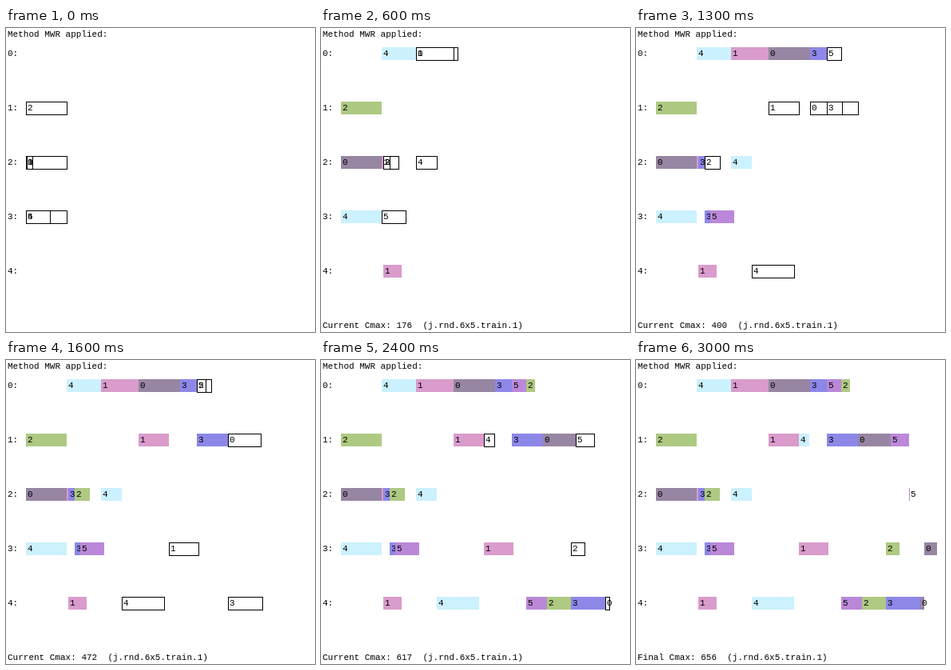
Write an HTML page with a canvas that moves like this. It is 387 px wide and 380 px high and loops after 3.1 s.

```html
<!DOCTYPE html>
<html lang="en">
<head>
<meta charset="utf-8">
<title>Job shop schedule</title>
<style>
  html, body { margin: 0; width: 100%; height: 100%; overflow: hidden; background: #fff; }
  canvas { display: block; }
</style>
</head>
<body>
<canvas id="stage" width="387" height="380"></canvas>
<script>
const stage = document.getElementById('stage');
const ctx = stage.getContext('2d');

const STEP_MS = 100, MACHINES = 5;
const LEFT = 25, SCALE = 0.5366;
const ROW_TOP = 24, ROW_GAP = 68, BAR_HEIGHT = 16, BASELINE = 11;

// The problem instance: machine order and durations per job. All positions follow from it.
const job = (color, route, ...durations) =>
  ({ color, ops: durations.map((duration, i) => ({ machine: +route[i], duration })) });
const JOBS = [
  job('#9786a3', '20143', 96, 97, 76, 10, 29),
  job('#d99ccc', '24013', 3, 44, 87, 71, 69),
  job('#aec982', '12043', 96, 36, 20, 55, 32),
  job('#8d87e8', '23014', 15, 14, 40, 72, 80),
  job('#ccf1ff', '30241', 96, 80, 49, 99, 25),
  job('#bb88d9', '30412', 56, 34, 48, 44, 2)
];

// Places a job's next operation in the first gap that fits.
function nextOp({ color, ops }, id, done) {
  const own = done.filter(op => op.id === id);
  const rest = ops.slice(own.length);
  if (!rest.length) return null;
  const { machine, duration } = rest[0];
  const workLeft = rest.reduce((sum, op) => sum + op.duration, 0);
  let start = Math.max(0, ...own.map(op => op.end));
  const busy = done.filter(op => op.machine === machine).sort((a, b) => a.start - b.start);
  for (const op of busy) {
    if (start + duration <= op.start) break;
    start = Math.max(start, op.end);
  }
  return { id, color, machine, start, end: start + duration, workLeft };
}

// The job with the most work remaining is scheduled first.
function buildStates() {
  const states = [];
  let done = [];
  for (;;) {
    const pending = JOBS.map((item, id) => nextOp(item, id, done)).filter(Boolean);
    states.push({ done, pending });
    if (!pending.length) return states;
    done = [...done, pending.reduce((best, op) => op.workLeft > best.workLeft ? op : best)];
  }
}

const states = buildStates();
const timeX = t => LEFT + Math.floor(t * SCALE);
const rowY = machine => ROW_TOP + machine * ROW_GAP;

function write(text, x, y) {
  ctx.fillStyle = '#000';
  ctx.fillText(text, x, y);
}

function drawOp(op, scheduled) {
  const x = timeX(op.start), y = rowY(op.machine), width = timeX(op.end) - x;
  if (scheduled) {
    ctx.fillStyle = op.color;
    ctx.fillRect(x, y, width, BAR_HEIGHT);
  } else {
    ctx.strokeRect(x + 0.5, y + 0.5, width, BAR_HEIGHT);
  }
  write(op.id, x + 2, y + BASELINE);
}

function draw({ done, pending }) {
  ctx.fillStyle = '#fff';
  ctx.fillRect(0, 0, stage.width, stage.height);
  ctx.font = '11px "Courier New", "Liberation Mono", monospace';

  write('Method MWR applied:', 2, BASELINE);
  for (let m = 0; m < MACHINES; m++) write(m + ':', 2, rowY(m) + BASELINE);
  done.forEach(op => drawOp(op, true));
  pending.forEach(op => drawOp(op, false));
  if (done.length) {
    const cmax = Math.max(...done.map(op => op.end));
    const label = pending.length ? 'Current' : 'Final';
    write(`${label} Cmax: ${cmax}  (j.rnd.6x5.train.1)`, 2, 375);
  }
}

function tick() {
  draw(states[Math.floor(performance.now() / STEP_MS) % states.length]);
  requestAnimationFrame(tick);
}
tick();
</script>
</body>
</html>
```
